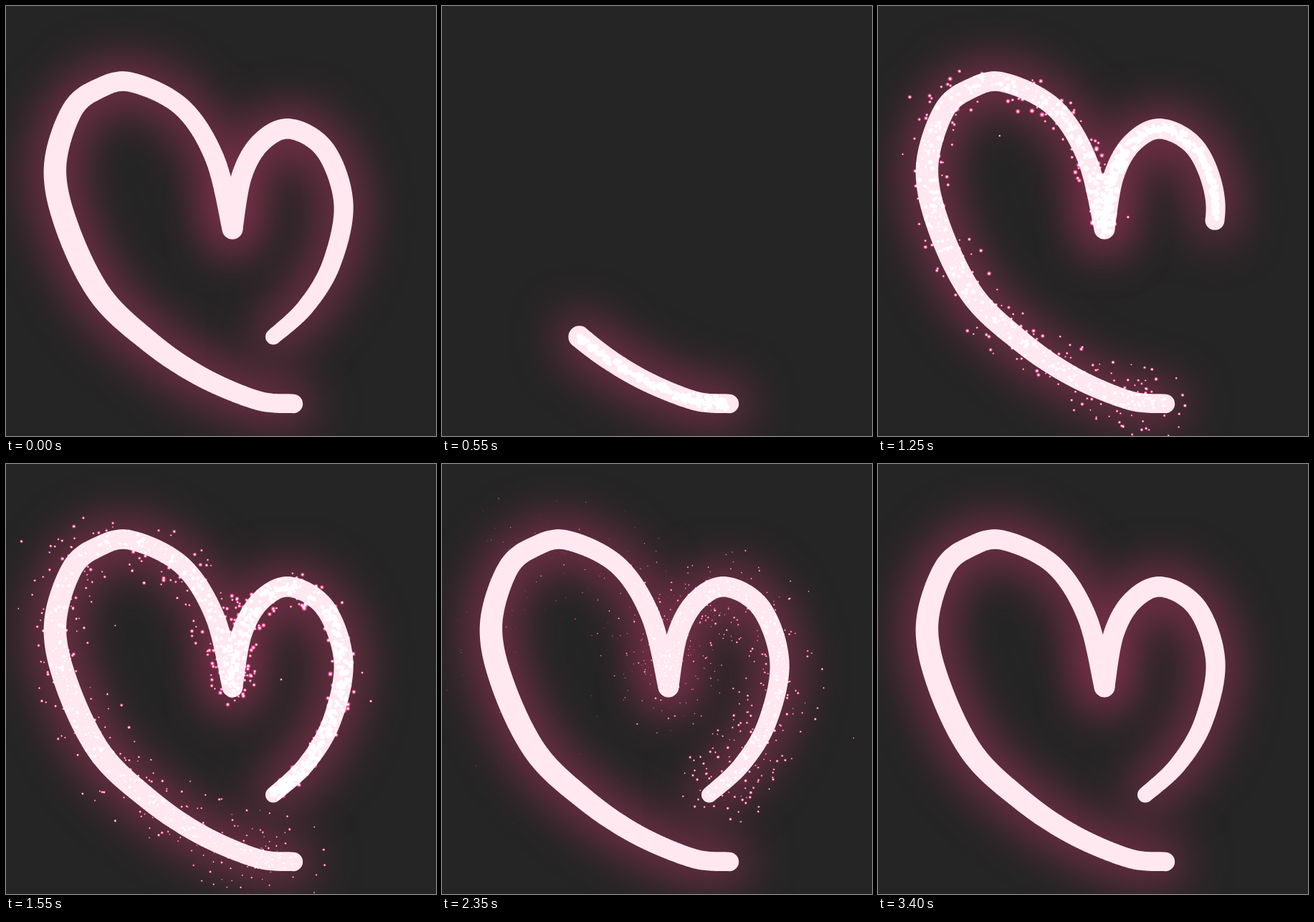
Recreate the animation shown at these times as an HTML page with a canvas. Size 600 by 600 pixels, loop 3.65 s.

```html
<!DOCTYPE html>
<html lang="en">
<head>
<meta charset="utf-8">
<title>Neon heart</title>
<style>
html, body { margin: 0; width: 100%; height: 100%; overflow: hidden; background: #252525; }
canvas { display: block; width: 600px; height: 600px; }
</style>
</head>
<body>
<canvas id="stage" width="600" height="600"></canvas>
<script>
const ctx = document.getElementById('stage').getContext('2d');
const LOOP = 3650, STEP = 50, TAU = Math.PI * 2;
const SPARKS = 1000, GLOW = 14;

// two brush strokes: a few points, the brush radius along the way, and the time span
const strokes = [
  {
    keys: [[401, 555], [350, 550], [270, 516], [197, 466], [131, 402], [85, 308], [68.5, 225],
      [92, 146], [130, 115], [175, 106.5], [245, 141], [291, 212], [316, 311]],
    radius: u => 14.8 - 1.6 * Math.cos(TAU * u / 0.82),
    from: 380, to: 960
  },
  {
    keys: [[316, 311], [329, 237], [356, 190], [397, 171.5], [446, 202], [471, 277],
      [454, 360], [418, 420], [373, 461.5]],
    radius: u => 14.3 - 3.3 * u ** 3,
    from: 960, to: 1440
  }
];

function spline(a, b, c, d, u) {
  return b + 0.5 * u * (c - a + u * (2 * a - 5 * b + 4 * c - d + u * (3 * (b - c) + d - a)));
}

// points spaced evenly along a smooth curve through the keys
function trace(keys, gap = 1.5) {
  const at = i => keys[Math.max(0, Math.min(keys.length - 1, i))];
  const out = [keys[0]];
  let last = keys[0], run = 0;
  for (let i = 0; i < keys.length - 1; i++) {
    for (let j = 1; j <= 300; j++) {
      const p = [0, 1].map(k => spline(at(i - 1)[k], at(i)[k], at(i + 1)[k], at(i + 2)[k], j / 300));
      run += Math.hypot(p[0] - last[0], p[1] - last[1]);
      last = p;
      if (run >= gap) { out.push(p); run -= gap; }
    }
  }
  return [...out, last];
}

for (const s of strokes) {
  const pts = trace(s.keys);
  s.pts = pts.map(([x, y], i) => [x, y, s.radius(i / (pts.length - 1))]);
}

function tipIndex(s, t) {
  const u = Math.max(0, Math.min(1, (t - s.from) / (s.to - s.from)));
  const eased = (u + 0.5 - Math.cos(Math.PI * u) / 2) / 2;
  return Math.round(eased * (s.pts.length - 1));
}

let seed = 4711;
function rnd() {
  seed = (seed * 1664525 + 1013904223) % 4294967296;
  return seed / 4294967296;
}

// sparks leave the brush tip at a steady rate while it draws
const sparks = Array.from({ length: SPARKS }, (_, i) => {
  const born = 385 + (i + rnd()) / SPARKS * 1052;
  const s = strokes[born < strokes[0].to ? 0 : 1];
  const [x, y] = s.pts[tipIndex(s, born)];
  const a = rnd() * TAU;
  const v = (0.004 + 0.06 * rnd() ** 1.3) * (rnd() < 0.02 ? 2.6 : 1);
  return {
    born,
    x: x + (rnd() - 0.5) * 7,
    y: y + (rnd() - 0.5) * 7,
    vx: Math.cos(a) * v,
    vy: Math.sin(a) * v,
    size: 1.9 + 2.4 * rnd(),
    life: 1550 + 400 * rnd()
  };
});

function dot(path, x, y, r) {
  path.moveTo(x + r, y);
  path.arc(x, y, r, 0, TAU);
}

function brush(pts, extra) {
  const path = new Path2D();
  for (const [x, y, r] of pts) dot(path, x, y, r + extra);
  return path;
}

function drawHeart(t) {
  const drawn = strokes.filter(s => t > s.from).map(s => s.pts.slice(0, tipIndex(s, t) + 1));
  ctx.filter = 'blur(32px)';
  ctx.fillStyle = 'rgb(130,49,75)';
  for (const pts of drawn) ctx.fill(brush(pts, GLOW));
  ctx.filter = 'none';
  ctx.fillStyle = '#ffe8f0';
  for (const pts of drawn) ctx.fill(brush(pts, 0));
}

function disc(x, y, r, color, mode) {
  ctx.globalCompositeOperation = mode;
  ctx.fillStyle = color;
  ctx.beginPath();
  dot(ctx, x, y, r);
  ctx.fill();
}

function drawSparks(t) {
  for (const s of sparks) {
    const age = t - s.born;
    if (age < 0 || age >= s.life) continue;
    const r = s.size * (1 - age / s.life) ** 0.85;
    const x = s.x + s.vx * age, y = s.y + s.vy * age;
    // the halo adds up to white over the bright stroke
    disc(x, y, r, 'rgb(150,25,80)', 'lighter');
    disc(x, y, r * 0.52, '#fff', 'source-over');
  }
  ctx.globalCompositeOperation = 'source-over';
}

function draw(t) {
  ctx.fillStyle = '#252525';
  ctx.fillRect(0, 0, 600, 600);
  if (t === 0) {
    drawHeart(LOOP);
  } else if (t >= 400) {
    drawHeart(t);
    drawSparks(t);
  }
}

const start = performance.now();
let shown = -1;
function tick() {
  const ms = Math.max(0, performance.now() - start);
  const t = Math.floor((ms % LOOP) / STEP) * STEP;
  if (t !== shown) {
    shown = t;
    draw(t);
  }
  requestAnimationFrame(tick);
}
tick();
</script>
</body>
</html>
```
